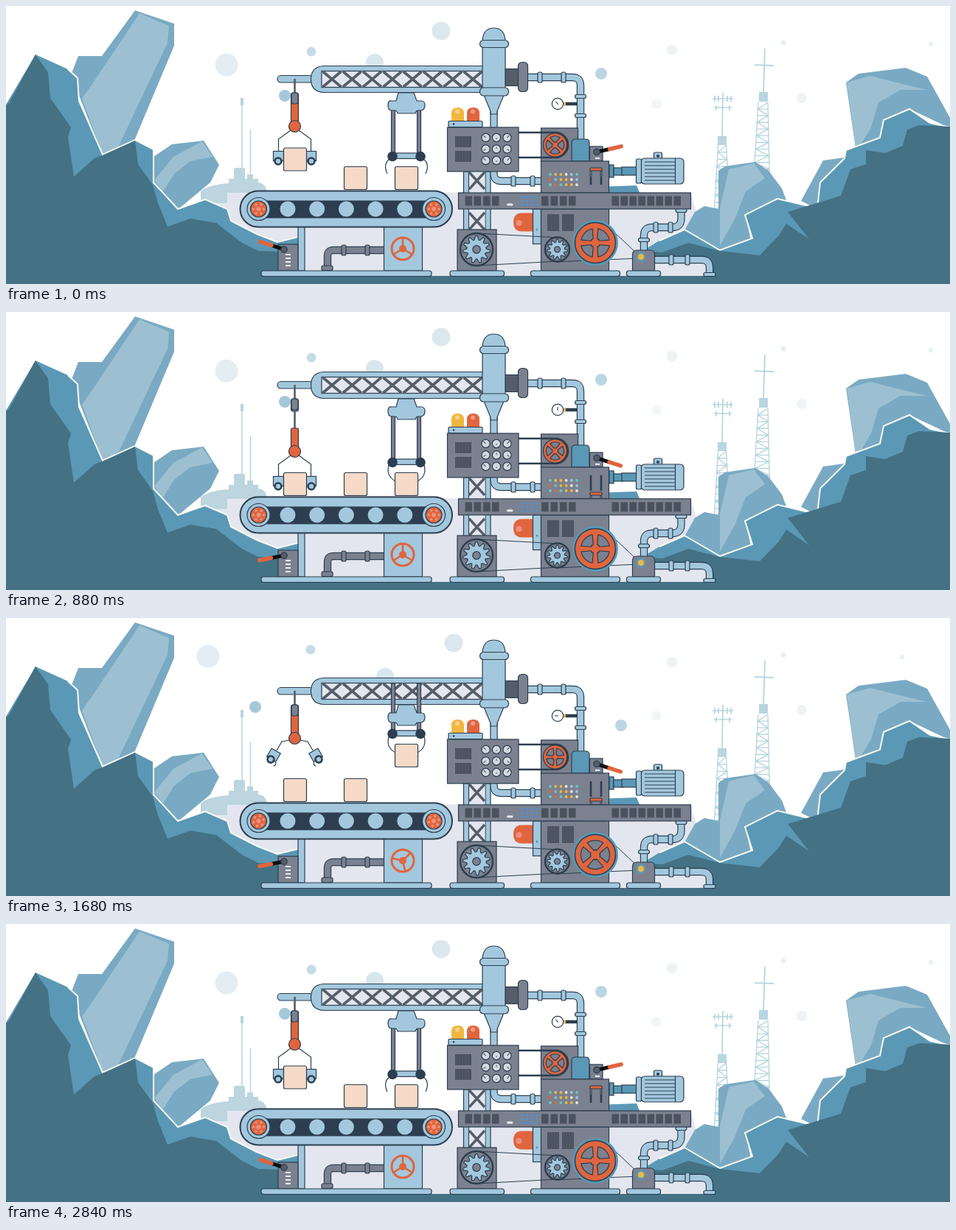
Write an HTML page that moves like this. It is 1280 by 378 pixels and loops after 2.88 s.

```html
<!DOCTYPE html>
<html>
<head>
<meta charset="utf-8">
<style>
html, body { margin: 0; width: 100%; height: 100%; overflow: hidden; background: #fff; }
svg { display: block; width: 1280px; height: 378px; }
.o { stroke: #2c3e50; stroke-width: 1.2; }
.n { fill: none; }
</style>
</head>
<body>
<svg id="stage" viewBox="0 0 1280 378"></svg>
<script>
const INK = '#2c3e50', BLUE = '#a3c8dd', MID = '#5b98b5', GRAY = '#7b818f', DARK = '#555e68',
  ORANGE = '#e0653e', PALE = '#e3e6ee', FRONT = '#447184', ROCK = '#7aaac3', FACE = '#9cc0d1',
  FAR = '#b8d5e0', PEACH = '#f4dac7', YELLOW = '#f0b73f';
const many = (list, fn) => list.map(fn).join('');
const count = (n, fn) => many([...Array(n).keys()], fn);

// Plain shapes; the "o" variants carry the thin ink outline.
const rect = (x, y, w, h, fill, r = 0, more = '') =>
  `<rect x="${x}" y="${y}" width="${w}" height="${h}" rx="${r}" fill="${fill}" ${more}/>`;
const orect = (x, y, w, h, fill, r = 0, more = '') => rect(x, y, w, h, fill, r, `class="o" ${more}`);
const disc = (x, y, r, fill, more = '') => `<circle cx="${x}" cy="${y}" r="${r}" fill="${fill}" ${more}/>`;
const odisc = (x, y, r, fill, more = '') => disc(x, y, r, fill, `class="o" ${more}`);
const poly = (points, fill, more = '') => `<polygon points="${points}" fill="${fill}" ${more}/>`;
const path = (d, fill, more = 'class="o"') => `<path d="${d}" fill="${fill}" ${more}/>`;
const line = (d, color, w, more = '') =>
  `<path class="n" d="${d}" stroke="${color}" stroke-width="${w}" ${more}/>`;
const group = (id, body, more = '') => `<g id="${id}" ${more}>${body}</g>`;
const pipe = (d, color = BLUE) => line(d, INK, 10.4) + line(d, color, 8);
const collar = (x, y, color = BLUE) => orect(x - 3, y - 7, 6, 14, color, 2);
const ring = (x, y, color = BLUE) => orect(x - 7.5, y - 2.5, 15, 5, color, 2.5);
const box = (id, x, y = 218.5) => orect(x + .5, y, 31, 31, PEACH, 2, `id="${id}"`);
const grille = (x, y, w, h) => rect(x, y, w, h, '#4a525e') +
  count(Math.floor(w / 4), i => line(`M${x + 2 + i * 4} ${y}v${h}`, '#626a76', .6));

function lattice(x, top, bottom, w0, w1, lean, n) {
  const at = k => {
    const f = k / n, w = w0 + (w1 - w0) * f;
    return { y: top + (bottom - top) * f, l: x + lean * f - w / 2, r: x + lean * f + w / 2 };
  };
  const a = at(0), b = at(n);
  let d = `M${a.l} ${a.y}L${b.l} ${b.y}M${a.r} ${a.y}L${b.r} ${b.y}`;
  for (let k = 0; k < n; k++) {
    const p = at(k), q = at(k + 1);
    d += k % 2 ? `M${p.l} ${p.y}L${q.r} ${q.y}H${q.l}` : `M${p.r} ${p.y}L${q.l} ${q.y}H${q.r}`;
  }
  return line(d, FAR, 1.4);
}

// Spoked wheel openings around a centre, with a given outer radius.
function openings(x, y, r) {
  const w = Array.from({ length: 4 }, (_, i) => {
    const hub = r * .28, gap = r * .14, out = r * .98;
    return `<path d="M${gap} ${-hub}L${gap * 1.4} ${-out}A${out} ${out} 0 0 1 ${out} ${-gap * 1.4}L${hub} ${-gap}Q${hub} ${-hub} ${gap} ${-hub}Z" fill="${GRAY}" class="o" stroke-linejoin="round" transform="rotate(${i * 90})"/>`;
  });
  return `<g transform="translate(${x} ${y})">${w.join('')}</g>`;
}

const clouds = [
  [299, 80, 15.5, '#e4edf2', 274, 52], [414, 62, 6.5, '#c5dce6', 413, 43], [590, 34, 12.5, '#dbe8ee', 607, 34],
  [500, 77, 12, '#d8e7ed', 514, 80], [378, 122, 8, '#a5c8d8', 338, 121], [807, 92, 8, '#bbd6e3', 834, 146],
  [903, 60, 7.3, '#edf3f6'], [882, 133, 6.8, '#f1f6f8'], [1054, 50, 3.5, '#e6eff3'],
  [1079, 125, 7, '#edf3f6'], [1254, 52, 3.3, '#e9f1f4', 1215, 53]
];

const backdrop = () =>
  many(clouds, ([x, y, r, fill], i) => disc(x, y, r, fill, `id="cloud${i}"`)) +
  line('M320 125V240M331.500 169V240', FAR, 1.5) + rect(318, 125, 4, 10, FAR) +
  rect(309, 220, 15, 18, '#bcd5df', 3) + rect(327, 229, 8, 10, '#bcd5df') +
  line('M1029 58L1027 118M1015 80L1041 81', FAR, 1.8) + rect(1021, 117, 12, 13, FAR) +
  lattice(1026.5, 131, 240, 13, 22, -2, 12) +
  line('M972 118L971 177M958 126H986M960 138H984', FAR, 1.7) +
  line('M961 122v8M966 122v8M978 122v8M983 122v8M963 135v7M981 135v7', FAR, 1.7) +
  rect(965, 177, 12, 12, FAR) + lattice(971, 189, 277, 11, 21, 0, 9) +
  poly('282,253.5 928,253.5 962,367 282,367', PALE) +
  path('M264 268V252Q274 243 302 241V235H342V240Q353 241 354 254H300V268Z', '#bcd5df', '') +
  poly('800,246 855,244 860,256 800,256', MID);

function rocks() {
  const left = 'M84 86L97 98L99 129L131 202L175 182L200 195V240L233 276L270 263L300 276L305 292L340 310L368 321L396 314';
  const right = 'M886 319L920 304L968 332L1012 316L1002 284L1046 262L1100 275L1104 240L1137 207L1139 196L1185 179L1190 155L1225 140L1253 159L1280 165';
  return poly('88,94 98,68 130,68 175,6 228,24 228,54 174,183 131,203', ROCK) +
    poly('181,10 221,27 219,50 152,192 131,201 103,126 117,106', FACE) +
    poly('200,205 225,188 268,183 289,216 277,240 234,276 198,240', ROCK) +
    poly('201,237 227,205 266,184 280,205 250,211 228,228 213,252', FACE) +
    path(left + 'V378H0V134L40 66Z', MID, '') + line(left, '#f7faf5', 2) +
    poly('0,135 4,132 40,66 57,90 60,125 88,165 84,178 92,232 120,207 131,203 175,183 179,215 199,243 206,268 219,300 250,289 285,295 320,322 342,333 372,334 372,378 0,378', FRONT) +
    poly('1139,104 1156,92 1220,84 1249,96 1280,152 1280,166 1225,140 1190,155 1184,182 1152,193', ROCK) +
    poly('1140,104 1172,95 1248,114 1213,114 1183,131 1173,165 1158,190 1152,192', FACE) +
    poly('1078,265 1108,210 1137,206 1137,210 1104,240 1100,276', ROCK) +
    poly('920,305 934,280 947,272 966,276 966,224 975,218 1016,212 1034,224 1052,248 1058,264 1003,286 1010,318 968,333', ROCK) +
    poly('980,222 1014,214 1029,234 1003,252 988,290 968,326 968,275', FACE) +
    path(right + 'V378H962L945 343H868V330Z', MID, '') + line(right, '#f7faf5', 2) +
    poly('1280,164 1238,162 1222,168 1216,190 1192,200 1166,196 1166,215 1145,222 1132,258 1060,280 1089,317 1058,296 1048,312 1022,339 968,333 925,322 890,335 864,333 868,343 950,343 962,368 1280,378', FRONT) +
    rect(0, 367, 1280, 11, FRONT);
}

const claw = () => {
  const hand = `<g class="hand">${orect(362.500, 197.500, 14, 13, BLUE)}${disc(369, 211, 4.5, BLUE, `stroke="${INK}" stroke-width="2.6"`)}${line('M376 211q4 2 1 6', INK, 1.2)}</g>`;
  const side = `<path class="o n arm"/>${hand}`;
  return line('M391.500 99V160', DARK, 2.6) + orect(386.500, 118, 10, 17, GRAY, 3) +
    group('claw', side + `<g transform="matrix(-1 0 0 1 783 0)">${side}</g>` +
      orect(386.500, 132, 10, 26, ORANGE, 2) + odisc(391.5, 163.5, 8, ORANGE)) +
    orect(387, 118, 9, 15, GRAY, 3, 'stroke-width="2"') + box('boxA', 376);
};

const trolley = () => group('trolley',
  group('lift', many([522.500, 557.500], x => orect(x, 136, 5, 67, GRAY)) +
    orect(524, 200, 38, 7.5, BLUE) + line('', INK, 1.2, 'id="grip"') +
    disc(524, 204.500, 6.8, INK) + disc(562, 204.500, 6.8, INK) + box('boxC', 527)) +
  path('M532 118H553L557 129H563Q568 129 568 135T563 142H559Q556 142 555 146H531Q530 142 527 142H523Q518 142 518 135T523 129H529Z', BLUE));

const truss = () => orect(368, 94.500, 60, 9.500, BLUE, 4.7) +
  path('M648 81.500H430Q413.500 83 413.500 99.500T430 117.500H648Z', BLUE) +
  orect(428, 88.500, 220, 22, PALE) +
  count(8, i => line(`M${429.5 + i * 27.3} 89l25 21m0 -21l-25 21`, DARK, 3.6));

function gear(id, x, y, r) {
  const teeth = 11, points = [];
  for (let i = 0; i < teeth * 4; i++) {
    const a = (i + .5) / (teeth * 4) * 2 * Math.PI, q = r * (i % 4 < 2 ? .84 : .6);
    points.push((x + q * Math.cos(a)).toFixed(1) + ',' + (y + q * Math.sin(a)).toFixed(1));
  }
  return disc(x, y, r, GRAY, `stroke="${INK}" stroke-width="2.4"`) +
    group(id, poly(points.join(' '), BLUE, 'class="o"') + odisc(x, y, r * .24, GRAY));
}

const roller = (id, x) => odisc(x, 276, 15.5, BLUE) + odisc(x, 276, 11, ORANGE) +
  group(id, disc(x, 276, 3, '#ea957c') + count(6, i =>
    disc(x + 7 * Math.cos(i * 1.047), 276 + 7 * Math.sin(i * 1.047), 1.8, '#ea957c')));

const lever = (id, x, y) => group(id,
  line(`M${x} ${y}h18`, '#111', 5) + line(`M${x + 18} ${y}h16`, ORANGE, 5.5, 'stroke-linecap="round"')) +
  odisc(x, y, 4.2, DARK);

const conveyor = () =>
  orect(396, 298, 9, 62, BLUE) +
  pipe('M513 332H444Q436 332 436 340V355', GRAY) + collar(458, 332, GRAY) + collar(490, 332, GRAY) +
  orect(428, 353, 15, 6.5, GRAY, 2) +
  orect(512.500, 298, 52, 62, BLUE) +
  group('valve', disc(538, 330, 15, 'none', `stroke="${ORANGE}" stroke-width="3"`) +
    line('M538 330V315M538 330l-13 8M538 330l13 8', ORANGE, 2.6) + disc(538, 330, 5, ORANGE)) +
  orect(369, 324, 27, 36, GRAY) + many([338, 343, 348, 353], y => line(`M379 ${y}h7`, '#eef0f2', 2)) +
  lever('leverL', 377, 331) +
  rect(317.5, 251.500, 287.500, 49, BLUE, 24.500, `stroke="${INK}" stroke-width="2"`) +
  rect(345, 264.500, 232, 24, INK) + count(5, i => disc(382 + i * 39.7, 276, 10.5, BLUE)) +
  roller('rollL', 342.5) + roller('rollR', 580) + box('boxB', 458);

const tower = () =>
  pipe('M707 97H768Q779 97 779 108V184') + collar(724, 97) + collar(756, 97) + ring(779, 123) + ring(779, 149) +
  line('M757 133H775', INK, 4.5) + line('M755 133H759', YELLOW, 4.500) +
  odisc(748, 133, 7.7, '#fff') + line('M748 134V129', DARK, 1.3, 'id="needle"') +
  orect(677, 85.500, 18, 23, DARK) + orect(694.5, 76.500, 13, 40, GRAY, 5) +
  pipe('M661.500 140V166') + path('M648 121H675L666 143V147H657V143Z', BLUE) +
  path('M646 47Q647 30 661.500 30T677 47V115H646Z', BLUE) +
  orect(642.500, 46.500, 39, 10, BLUE, 5) + orect(642.500, 111, 39, 11, BLUE, 5);

const lamp = (x, color) => path(`M${x} 156V146Q${x} 138 ${x + 8.5} 138T${x + 17} 146V156Z`, color, 'class="lamp"') +
  disc(x + 8, 143.500, 3, color === YELLOW ? '#f7d38a' : '#f09a85');

const panel = () =>
  many([620.500, 650], x => orect(x, 225, 7, 80, BLUE)) + rect(628, 225, 21.500, 79, PALE) +
  many([226, 281], y => line(`M628 ${y}l21 23m0 -23l-21 23`, DARK, 3.4)) +
  pipe('M661.500 224V229Q662 238 672 238H726') + collar(688, 238) + collar(714, 238) +
  orect(725.500, 166, 50, 46, GRAY) +
  line('M695 172H745A17 17 0 0 1 745 206H695', INK, 2.6) +
  odisc(744.5, 189, 16, ORANGE) + group('fan', openings(744.5, 189, 12)) +
  orect(598.500, 165, 96.500, 60, GRAY) + grille(609, 177, 22, 15) + grille(609, 197, 22, 15) +
  count(9, i => {
    const x = 650.500 + i % 3 * 14.5, y = 179 + Math.floor(i / 3) * 15.500;
    return odisc(x, y, 5.6, '#d5dade') + line(`M${x} ${y}l${(i % 3 - 1) * 3} ${i % 2 ? 2 : -3}`, DARK, 1.1);
  }) +
  orect(600, 156.500, 46, 8, BLUE, 1) + disc(607, 160.500, 1.3, INK) + lamp(604, YELLOW) + lamp(625, ORANGE);

function machine() {
  const lights = ['#65c9c0', '#ece5e2', ORANGE, YELLOW, '#65c9c0', YELLOW, '#9fc5dc'];
  const slots = [622.5, 634.5, 647, 659, 726, 738.5, 751, 763, ...Array.from({ length: 8 }, (_, i) => 821.5 + i * 12)];
  return path('M767 211V186Q767 181 772 181H786Q791 181 791 186V211Z', MID) +
    orect(791.500, 191, 17.5, 20, GRAY) + line('M799 207h6', '#eef0f2', 2) + lever('leverR', 801, 198.500) +
    orect(725.500, 211, 92, 43, GRAY) +
    count(18, i => disc(738 + i % 6 * 7.2, 229 + Math.floor(i / 6) * 7, 1.9, lights[i * 5 % 7], 'class="light"')) +
    many([793, 807], x => line(`M${x} 222v21`, INK, 2.6)) +
    group('switch', line('M793 223V232M807 223V232', DARK, 3.5) + orect(792, 220, 16, 4, ORANGE, 1)) +
    // motor
    orect(818, 216, 6, 17, MID) + orect(824, 220, 13, 10, MID) + orect(835, 219, 20, 11, MID) +
    orect(878.500, 199, 11, 9, BLUE, 2) + disc(884, 204, 2, INK) +
    orect(861, 207, 58, 35, BLUE, 5) + orect(854.500, 208, 7, 33, BLUE, 2) +
    count(6, i => line(`M866 ${212 + i * 5}H908`, INK, 1)) + line('M907.500 207V242', INK, 1.2) +
    // pump and its pipes
    pipe('M865 334V312Q865 301 876 301H903Q915.500 301 915.500 289V275') + ring(865, 318) + collar(881, 301) + collar(901, 301) + ring(915.5, 278) +
    pipe('M878 345H943Q954 345 954 356V364') + collar(902, 345) + collar(924, 345) + orect(946, 362.500, 16, 5, BLUE, 2) +
    // lower cabinets
    path('M714 281.500H699Q688 282 688 294T699 306.500H714Z', ORANGE, 'class="lamp"') + disc(695.500, 295, 4, '#f08c7e') +
    orect(714.500, 276, 11, 47.500, BLUE) + disc(720, 304, 1.6, MID) +
    orect(725.500, 276, 92, 84, GRAY) + grille(734, 283, 16, 23) + grille(754, 283, 16, 23) +
    orect(612, 304, 53, 56, GRAY) +
    orect(613.500, 254, 315, 22, GRAY) + many(slots, x => rect(x, 258.500, 9.5, 13, '#4a525e')) +
    rect(679, 268.500, 8.5, 3, '#e9ebee', 1.5) +
    count(12, i => disc(700 + i % 4 * 6.5, 260 + Math.floor(i / 4) * 5, 1.8, '#5290cf')) +
    line('M638 309L750 315M638 353L750 347M824 307L858 339M745 348L858 343', INK, 1) +
    gear('gearL', 638, 331, 22) + gear('gearR', 747.5, 331, 16.500) +
    disc(799, 322, 31, MID) + disc(799, 322, 27.500, ORANGE, `stroke="${INK}" stroke-width="1.5"`) +
    group('wheel', openings(799, 322, 19.5)) +
    path('M849.500 360V338Q849.500 332 855 332H874Q879.500 332 879.500 338V360Z', GRAY) +
    disc(861, 341, 6.8, MID) + disc(861, 341, 4, YELLOW) +
    many([[346, 231], [602, 73.5], [711.500, 121], [841.500, 46]], ([x, w]) => orect(x, 360, w, 7.500, BLUE, 3));
}

const stage = document.getElementById('stage');
stage.innerHTML = backdrop() + rocks() + truss() + trolley() + claw() + conveyor() + tower() + panel() + machine();

const all = s => stage.querySelectorAll(s);
const set = (id, attrs) => {
  const el = document.getElementById(id);
  for (const k in attrs) el.setAttribute(k, attrs[k]);
};
const move = (id, x, y) => set(id, { transform: `translate(${x} ${y})` });
const spin = (id, deg, x, y) => set(id, { transform: `rotate(${deg} ${x} ${y})` });

const rest = { lever: 0, drop: 0, open: 0, grip: 0, lift: 0, slide: 0, turn: 0, cloud: 0, advance: 0, gauge: -40 };
// Each entry holds from its start time and keeps the earlier values.
const steps = [
  [160, { lever: 1 }],
  [880, { drop: 26, grip: 1, gauge: 0 }],
  [1280, { open: 1, lift: 27.5, turn: 20, gauge: 50 }],
  [1480, { cloud: 1 }],
  [1680, { drop: 0, lift: 47, turn: 45, gauge: -90 }],
  [2080, { slide: 72, advance: .5, turn: 75, gauge: 90 }],
  [2480, { open: 0, grip: 0, lift: 27.5, slide: 0, advance: 1, turn: 105, gauge: 0 }],
  [2840, rest]
];

function draw(now) {
  const t = now % 2880;
  const p = Object.assign({}, rest, ...steps.filter(s => t >= s[0]).map(s => s[1]));
  const dim = t >= 280 && t < 880 && Math.floor((t - 280) / 120) % 2 === 0;

  clouds.forEach(([x, y, , , x2 = x, y2 = y], i) => set('cloud' + i, p.cloud ? { cx: x2, cy: y2 } : { cx: x, cy: y }));
  all('.lamp').forEach(el => el.setAttribute('opacity', dim ? .22 : 1));
  all('.light').forEach((el, i) => el.setAttribute('opacity', p.turn === 20 && i % 2 ? .4 : 1));

  spin('leverL', p.lever ? 169 : 198, 377, 331);
  spin('leverR', p.lever ? 18 : -13, 801, 198.5);
  move('switch', 0, p.grip || p.lift ? 25 : 0);

  move('claw', 0, p.drop);
  all('.arm').forEach(el => el.setAttribute('d', p.open ? 'M385 166L374 168L367 180' : 'M386 169L369.500 181V198'));
  all('.hand').forEach(el => el.setAttribute('transform', p.open ? 'translate(-7 -18) rotate(30 369 205)' : ''));

  move('trolley', p.slide, 0);
  move('lift', 0, -p.lift);
  set('grip', {
    d: p.grip ? 'M519 208Q515 223 528 230M567 208Q571 223 558 230'
      : 'M520 208Q511 215 517 228M566 208Q575 215 569 228'
  });
  move('boxA', 82 * p.advance, t < 880 || t >= 2840 ? -25.5 : 0);
  move('boxB', 69 * p.advance, 0);
  set('boxC', { visibility: p.advance === 1 ? 'hidden' : 'visible' });

  spin('needle', p.gauge, 748, 133);
  spin('wheel', p.turn, 799, 322);
  spin('fan', 45 + p.turn, 744.5, 189);
  spin('valve', p.turn, 538, 330);
  spin('gearL', p.turn, 638, 331);
  spin('gearR', p.turn, 747.5, 331);
  spin('rollL', p.turn, 342.5, 276);
  spin('rollR', p.turn, 580, 276);
}

const start = performance.now();
(function tick() {
  draw(performance.now() - start);
  requestAnimationFrame(tick);
})();
</script>
</body>
</html>
```
